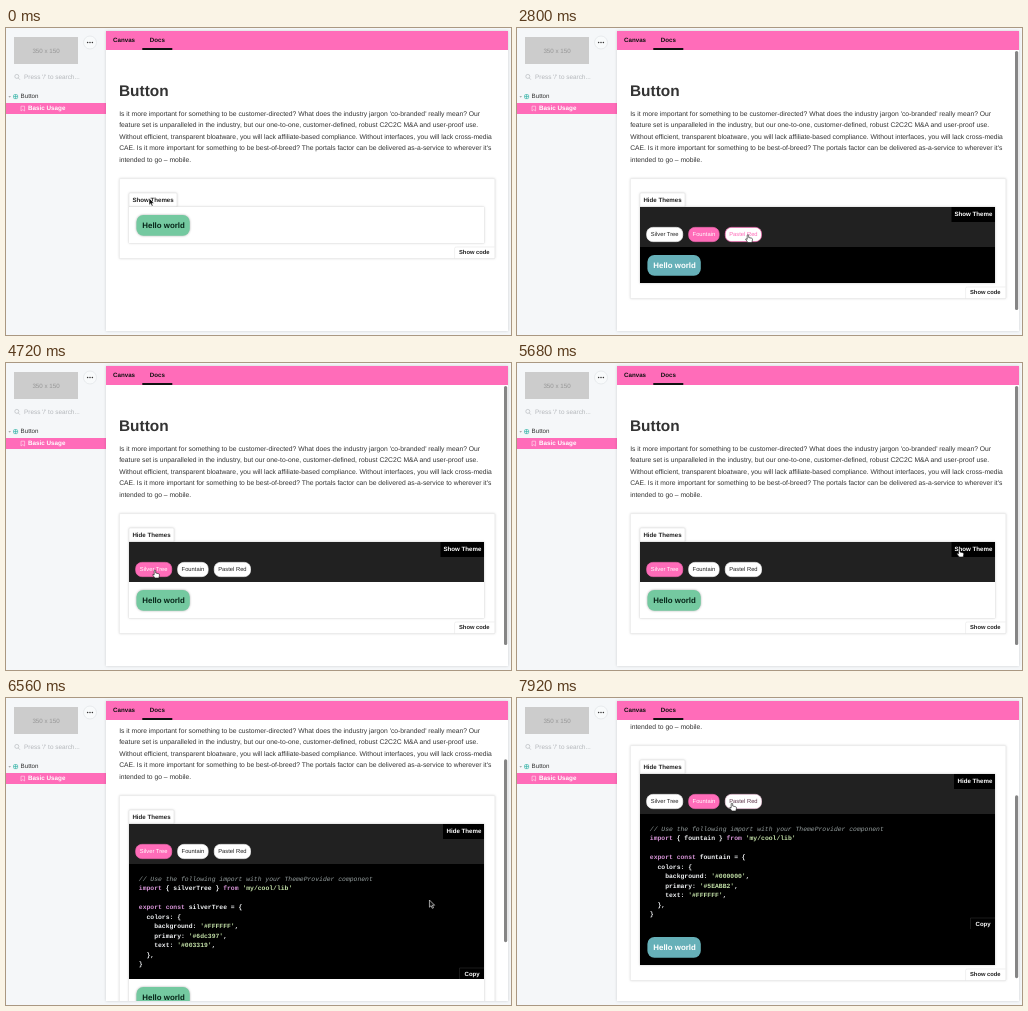
Write an HTML page that moves like this. It is 505 px wide and 307 px high and loops after 8 s.

```html
<!DOCTYPE html>
<html lang="en">
<head>
<meta charset="utf-8">
<title>Theme switcher</title>
<style>
html, body { margin: 0; width: 100%; height: 100%; overflow: hidden; background: #f5f7f9; }
svg { display: block; width: 505px; height: 307px; font-family: "Liberation Sans", Arial, sans-serif; font-size: 6.2px; fill: #333; text-rendering: geometricPrecision; }
.b { font-weight: 700; }
.tab { font-weight: 700; font-size: 6.15px; fill: #222; }
.card { fill: #fff; stroke: #e2e2e2; stroke-width: .6; filter: drop-shadow(0 .6px 1px rgba(0,0,0,.14)); }
.pill { font-size: 5.8px; }
.code { font: 700 6.4px "Liberation Mono", "DejaVu Sans Mono", monospace; fill: #f0f2f4; white-space: pre; }
.code .c { fill: #969f9f; font-weight: 400; font-style: italic; }
.code .k { fill: #d694d6; }
.code .s { fill: #c3e0a8; }
</style>
</head>
<body>
<svg viewBox="0 0 505 307">
  <defs>
    <clipPath id="page"><rect x="100" y="22" width="402" height="281"/></clipPath>
    <clipPath id="themeClip"><rect id="themeMask" x="123" y="179" width="355" height="0"/></clipPath>
    <clipPath id="codeClip"><rect id="codeMask" x="123" y="219" width="355" height="0"/></clipPath>
  </defs>
  <rect width="505" height="307" fill="#f5f7f9"/>

  <!-- sidebar -->
  <rect x="8" y="9" width="64" height="27" fill="#ccc"/>
  <text x="40" y="25" text-anchor="middle" fill="#969696">350 x 150</text>
  <circle cx="84" cy="14.5" r="6.5" fill="#f8fafb" stroke="#dde1e5" stroke-width=".6"/>
  <g fill="#333"><circle cx="81.6" cy="14.6" r=".75"/><circle cx="84" cy="14.6" r=".75"/><circle cx="86.4" cy="14.6" r=".75"/></g>
  <g fill="none" stroke="#b9bcc0" stroke-width=".7"><circle cx="10.8" cy="48.4" r="2"/><path d="M12.2 49.9l1.7 1.8"/></g>
  <text x="18" y="50.8" font-size="6.4" fill="#b4b7bb">Press '/' to search...</text>
  <path d="M2.4 68h2.6l-1.3 1.7z" fill="#aaa"/>
  <g fill="none" stroke="#37b5a8" stroke-width=".7"><rect x="7.6" y="66.6" width="4" height="4" rx="1"/><path d="M9.6 66.6v4M7.6 68.6h4"/></g>
  <text x="14.6" y="70.4">Button</text>
  <rect y="75" width="100" height="11" fill="#ff6cb9"/>
  <path d="M15 78.2h3.6v4.8l-1.8-1.4-1.8 1.4z" fill="none" stroke="#ffd3ea" stroke-width=".7"/>
  <text class="b" x="22" y="82.4" font-size="6.3" fill="#fff">Basic Usage</text>

  <!-- main panel -->
  <rect x="100" y="3" width="402" height="300" fill="#fff" style="filter:drop-shadow(0 .5px 1.5px rgba(0,0,0,.16))"/>
  <rect x="100" y="3" width="402" height="19" fill="#ff6cb9"/>
  <g class="b" fill="#111"><text x="107" y="14">Canvas</text><text x="143.8" y="14">Docs</text></g>
  <rect x="136.3" y="20" width="30" height="2" fill="#111"/>

  <g clip-path="url(#page)">
    <g id="scroll">
      <text class="b" x="113" y="68.4" font-size="15.4">Button</text>
      <g id="prose" font-size="6.75"></g>

      <rect id="card" class="card" x="113.3" y="150.6" width="375.6" height="80" rx="1"/>
      <g id="showCode">
        <path d="M448.6 231v-10.5q0-1.5 1.5-1.5h38.5" fill="none" stroke="#e6e6e6" stroke-width=".6"/>
        <text class="tab" x="453" y="225.9" style="font-size:5.8px">Show code</text>
      </g>
      <rect id="tabBox" class="card" x="123" y="165" width="48" height="14" rx="1"/>
      <rect id="frame" class="card" x="123" y="179" width="355" height="36"/>
      <text id="tabText" class="tab" x="126.4" y="174"></text>

      <g clip-path="url(#themeClip)">
        <rect x="123" y="179" width="355" height="40" fill="#212121"/>
        <rect id="toggleBox" y="179" height="15" fill="#000"/>
        <text id="toggle" class="tab" x="475.4" y="188.2" text-anchor="end" style="fill:#fff"></text>
        <g id="pills"></g>
      </g>
      <g clip-path="url(#codeClip)">
        <rect x="123" y="219" width="355" height="115" fill="#000"/>
        <g id="code" class="code"></g>
        <path d="M453.5 334v-11h25" fill="none" stroke="#2c2c2c" stroke-width=".6"/>
        <text class="tab" x="458.6" y="330.6" style="fill:#fff;font-size:6px">Copy</text>
      </g>

      <g id="preview">
        <rect id="stage" x="123" y="179" width="355" height="36"/>
        <rect id="button" x="130.4" y="187" width="53.4" height="20.8" rx="7" style="filter:drop-shadow(0 .8px .9px rgba(0,0,0,.32))"/>
        <text id="hello" class="b" x="157.6" y="200.2" font-size="7.9" text-anchor="middle">Hello world</text>
      </g>
    </g>
    <rect id="thumb" x="498" width="3.2" rx="1.6" fill="#858585"/>
  </g>

  <g id="cursor" stroke-width=".6" stroke-linejoin="round">
    <path id="arrow" d="M0 0v7.2l1.7-1.5 1.1 2.6 1.3-.5-1.1-2.6h2.2z" fill="#111" stroke="#fff"/>
    <path id="hand" d="M-.8 .6q.8-1.2 1.5 0v2.4l2.9.7q1 .3.9 1.4l-.6 2.9h-4l-2.3-3.1q-.2-1.1 1.6-.1z" fill="#fff" stroke="#111"/>
  </g>
</svg>
<script>
const LOOP = 8000;
const PINK = '#ff6cb9';
const $ = id => document.getElementById(id);
const set = (id, attrs) => { for (const k in attrs) $(id).setAttribute(k, attrs[k]); };

const themes = [
  { label: 'Silver Tree', name: 'silverTree', x: 129.7, w: 36, bg: '#ffffff', primary: '#74c9a0', text: '#062417', code: ['#FFFFFF', '#6dc397', '#003319'] },
  { label: 'Fountain', name: 'fountain', x: 171.7, w: 30.4, bg: '#000000', primary: '#66b0b8', text: '#ffffff', code: ['#000000', '#5EABB2', '#FFFFFF'] },
  { label: 'Pastel Red', name: 'pastelRed', x: 208.3, w: 36.2, bg: '#ffffff', primary: '#ff6b69', text: '#1a0505', code: ['#FFFFFF', '#FF6961', '#000000'] }
];

// [time, theme]
const picks = [[-1000, 0], [2240, 1], [3120, 2], [4160, 0], [7240, 1]];
// [theme, from, to]
const hovers = [[1, 1880, 2240], [2, 2600, 3120], [0, 3880, 4160], [1, 7120, 7240], [2, 7880, 8400]];
// [time, x, y]
const path = [
  [80, 143, 170], [240, 142, 172.4], [1440, 142, 172.4], [2000, 187, 207],
  [2400, 187, 207], [2760, 231, 206.5], [3360, 231, 206.5], [3760, 166.8, 206.5],
  [3960, 149, 207], [4880, 149, 207], [5640, 442.3, 186], [6160, 442.3, 186],
  [6400, 428.2, 204], [6500, 428.2, 204], [7100, 197.4, 107.5], [7640, 197.4, 107.5], [7920, 215, 105]
];
const handTimes = [[480, 1540], [1880, 2520], [2600, 3460], [3860, 5040], [5520, 6240], [7060, 7740], [7840, 8000]];

const clamp = v => Math.max(0, Math.min(1, v));
const ease = p => p < .5 ? 2 * p * p : 1 - 2 * (1 - p) * (1 - p);
const ramp = (t, from, len) => ease(clamp((t - from) / len));
const within = (t, spans) => spans.some(([a, b]) => t >= a && t < b);

function mix(a, b, p) {
  const part = (c, i) => parseInt(c.slice(i, i + 2), 16);
  return `rgb(${[1, 3, 5].map(i => Math.round(part(a, i) + (part(b, i) - part(a, i)) * p))})`;
}

function cursorAt(t) {
  const next = path.findIndex(k => k[0] > t);
  if (next === 0) return path[0].slice(1);
  if (next < 0) return path[path.length - 1].slice(1);
  const [a, b] = [path[next - 1], path[next]];
  const p = ramp(t, a[0], b[0] - a[0]);
  return [a[1] + (b[1] - a[1]) * p, a[2] + (b[2] - a[2]) * p];
}

function codeMarkup({ name, code }) {
  const span = (c, s) => `<tspan class="${c}">${s}</tspan>`;
  const prop = (key, value) => [2, `${key}: ${span('s', `'${value}'`)},`];
  const lines = [
    [0, span('c', '// Use the following import with your ThemeProvider component')],
    [0, `${span('k', 'import')} { ${name} } ${span('k', 'from')} ${span('s', "'my/cool/lib'")}`],
    [0, ''],
    [0, `${span('k', 'export const')} ${name} = {`],
    [1, 'colors: {'],
    prop('background', code[0]), prop('primary', code[1]), prop('text', code[2]),
    [1, '},'], [0, '}']
  ];
  return lines.map(([indent, s], i) =>
    `<text x="${132.8 + indent * 7.68}" y="${235.8 + i * 9.5}">${s}</text>`).join('');
}

function build() {
  $('prose').innerHTML = [
    "Is it more important for something to be customer-directed? What does the industry jargon 'co-branded' really mean? Our",
    'feature set is unparalleled in the industry, but our one-to-one, customer-defined, robust C2C2C M&amp;A and user-proof use.',
    'Without efficient, transparent bloatware, you will lack affiliate-based compliance. Without interfaces, you will lack cross-media',
    "CAE. Is it more important for something to be best-of-breed? The portals factor can be delivered as-a-service to wherever it's",
    'intended to go – mobile.'
  ].map((s, i) => `<text x="113.2" y="${87.8 + i * 11.5}">${s}</text>`).join('');
  $('pills').innerHTML = themes.map((th, i) =>
    `<rect id="pill${i}" x="${th.x}" y="199.4" width="${th.w}" height="14.2" rx="6" stroke-width=".7"/>
     <text id="label${i}" class="pill" x="${th.x + th.w / 2}" y="208.2" text-anchor="middle">${th.label}</text>`).join('');
}

let shownCode = -1;

function draw(t) {
  const open = ramp(t, 620, 340);
  const code = ramp(t, 5900, 320);
  const scroll = Math.round(103 * ramp(t, 6226, 660));
  const grow = Math.round(40 * open + 115 * code);

  set('scroll', { transform: `translate(0 ${-scroll})` });
  set('card', { height: 80 + grow });
  set('showCode', { transform: `translate(0 ${grow})` });
  set('frame', { height: 36 + grow });
  set('preview', { transform: `translate(0 ${grow})` });
  set('themeMask', { height: 40 * open });
  set('codeMask', { height: 115 * code });
  set('tabBox', { width: t < 640 ? 48 : 45 });
  $('tabText').textContent = t < 640 ? 'Show Themes' : 'Hide Themes';
  const hide = t >= 5920;
  $('toggle').textContent = hide ? 'Hide Theme' : 'Show Theme';
  set('toggleBox', { x: hide ? 437 : 434.5, width: hide ? 41.5 : 44 });
  set('thumb', {
    y: 23 + scroll * .72,
    height: 280 - 21 * open - 76 * code,
    visibility: open > .5 ? 'visible' : 'hidden'
  });

  const n = picks.filter(p => p[0] <= t).length - 1;
  const now = picks[n][1];
  const last = picks[Math.max(0, n - 1)][1];
  const fade = clamp((t - picks[n][0]) / 300);
  const blend = key => mix(themes[last][key], themes[now][key], fade);
  set('stage', { fill: blend('bg') });
  set('button', { fill: blend('primary') });
  set('hello', { fill: blend('text') });

  themes.forEach((_, i) => {
    const on = i === now ? fade : i === last ? 1 - fade : 0;
    const h = hovers.find(([k, a, b]) => k === i && t >= a && t < b);
    const hover = h ? clamp((t - h[1]) / 150) : 0;
    set('pill' + i, { fill: mix('#ffffff', PINK, on), stroke: mix('#ffffff', PINK, Math.max(on, hover)) });
    set('label' + i, { fill: on > 0 ? mix('#222222', '#ffffff', on) : mix('#222222', PINK, hover) });
  });

  if (shownCode !== now) {
    shownCode = now;
    $('code').innerHTML = codeMarkup(themes[now]);
  }

  const hand = within(t, handTimes);
  set('cursor', { transform: `translate(${cursorAt(t)})` });
  set('arrow', { visibility: hand ? 'hidden' : 'visible' });
  set('hand', { visibility: hand ? 'visible' : 'hidden' });
}

build();
const start = performance.now();
function tick() {
  draw((performance.now() - start) % LOOP);
  requestAnimationFrame(tick);
}
tick();
</script>
</body>
</html>
```
